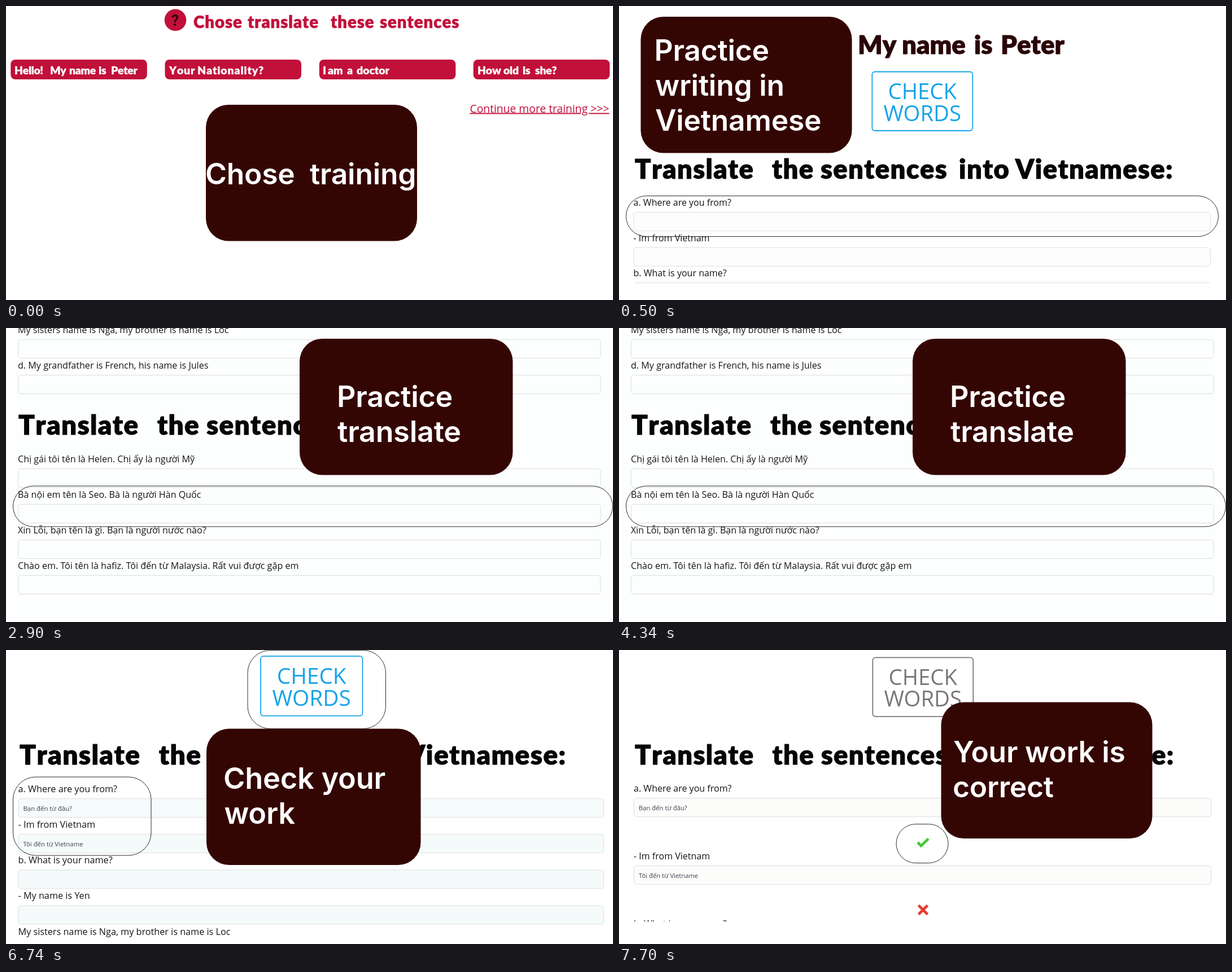
Write an HTML page that moves like this. It is 1075 px wide and 521 px high and loops after 8 s.

```html
<!DOCTYPE html>
<html lang="en">
<head>
<meta charset="utf-8">
<title>Translation training</title>
<style>
  html, body { margin: 0; width: 100%; height: 100%; overflow: hidden; background: #fff; }
  svg { display: block; width: 1075px; height: 521px; }

  .scene { visibility: hidden; animation: 8s step-end infinite; }
  #choose { animation-name: choose; }
  #write { animation-name: write; }
  #translate { animation-name: translate; }
  #check { animation-name: check; }
  #result { animation-name: result; }
  @keyframes choose { 0% { visibility: visible } 6.25%, 100% { visibility: hidden } }
  @keyframes write { 0% { visibility: hidden } 6.25% { visibility: visible } 36.25%, 100% { visibility: hidden } }
  @keyframes translate { 0% { visibility: hidden } 36.25% { visibility: visible } 66.25%, 100% { visibility: hidden } }
  @keyframes check { 0% { visibility: hidden } 66.25% { visibility: visible } 96.25%, 100% { visibility: hidden } }
  @keyframes result { 0% { visibility: hidden } 96.25%, 100% { visibility: visible } }

  text { white-space: pre; }
  .display { font-family: Lato, "Open Sans", sans-serif; font-weight: 900; font-kerning: none; stroke-width: .02em; stroke-linejoin: round; }
  .card rect { fill: #340603; }
  .card text { font-family: Inter, sans-serif; font-weight: 600; letter-spacing: -.2px; fill: #fff; }
  .label, .answer, .button text, .link { font-family: "Open Sans", "Noto Sans", sans-serif; }
  .label { fill: #151515; }
  .answer { fill: #3a414c; }
  .field { stroke: #dcdfdf; }
  .ring { fill: none; stroke: #2b2b2b; }
  .button rect { fill: #fff; stroke: currentColor; stroke-width: 1.8; }
  .button text { fill: currentColor; text-anchor: middle; }
  .link { font-size: 19.3px; font-weight: 500; fill: #c1103a; text-decoration: underline; }
  .mark { fill: none; stroke-width: 4.6; }
</style>
</head>
<body>
<svg id="stage" viewBox="0 0 1075 521" xmlns="http://www.w3.org/2000/svg"></svg>
<script>
const RED = '#c1103a', BLUE = '#16a3e8', GREY = '#7b7774';

const box = (x, y, w, h, r, attrs = '') =>
  `<rect x="${x}" y="${y}" width="${w}" height="${h}" rx="${r}" ${attrs}/>`;

const text = (x, y, str, cls = '', size = '') =>
  `<text x="${x}" y="${y}" class="${cls}"${size && ` style="font-size:${size}px"`}>${str}</text>`;

// Rounded display lettering, one start position per word
function display(str, xs, y, size, color, gap) {
  const words = str.split(' ').map((w, i) => `<tspan x="${xs[i]}">${w}</tspan>`).join(' ');
  return `<text class="display" y="${y}" fill="${color}" stroke="${color}" ` +
    `style="font-size:${size}px;letter-spacing:${gap}px">${words}</text>`;
}

const heading = (x, y, k, language = 'Vietnamese') =>
  display(`Translate the sentences into ${language}:`,
    [0, 243, 329, 574, 674].map(dx => x + dx * k), y, 47 * k, '#050505', 1.4 * k);

const card = (x, y, w, lines) =>
  `<g class="card">${box(x, y, w, 241.5, 40)}` +
  lines.map(([tx, ty, str]) => text(tx, ty, str, '', 51.5 * w / 374)).join('') + '</g>';

const ring = (x, y, w, h, r) => box(x, y, w, h, r, 'class="ring"');

function button(x, y, k, color) {
  const w = 178 * k, cx = x + w / 2, size = 38.3 * k;
  return `<g class="button" color="${color}">${box(x, y, w, 104.5 * k, 5)}` +
    text(cx, y + 48.8 * k, 'CHECK', '', size) +
    text(cx, y + 87 * k, 'WORDS', '', size) + '</g>';
}

const fields = (x, w, fill, ys) =>
  ys.map(y => box(x, y, w, 33, 5, `class="field" fill="${fill}"`)).join('');

const lines = (cls, x, size, rows) =>
  rows.map(([y, str]) => text(x, y, str, cls, size)).join('');

const pill = (x, str, xs, gap) =>
  box(x, 95, 241.5, 35, 8, `fill="${RED}"`) + display(str, xs, 120.5, 19.4, '#fff', gap);

const WHERE = 'a. Where are you from?', FROM = '- Im from Vietnam', NAME = 'b. What is your name?';
const FAMILY = 'My sisters name is Nga, my brother is name is Loc';
const REPLY_A = 'Bạn đến từ đâu?', REPLY_B = 'Tôi đến từ Vietname';

const scenes = {
  choose: [
    `<circle cx="300" cy="24.8" r="19.3" fill="${RED}"/>`,
    `<text x="299.5" y="34.5" text-anchor="middle" fill="#340603" style="font:700 27px Roboto,sans-serif">?</text>`,
    display('Chose translate these sentences', [332, 428, 575, 662], 38.5, 29.3, RED, 1),
    pill(8.3, 'Hello! My name is Peter', [15, 78, 112, 164, 186], -.3),
    pill(281.5, 'Your Nationality?', [289, 339], .9),
    pill(554.8, 'I am a doctor', [561, 570, 604, 621], 0),
    pill(827.7, 'How old is she?', [835, 881, 915, 937], -.2),
    text(821.5, 188.5, 'Continue more training &gt;&gt;&gt;', 'link'),
    card(354, 175, 374, [[353, 316, 'Chose'], [538, 316, 'training']])
  ],
  write: [
    card(38.5, 19, 374, [[62.5, 97, 'Practice'], [64, 159, 'writing in'], [64, 221, 'Vietnamese']]),
    display('My name is Peter', [423, 501, 629, 676], 85, 45.5, '#2a0507', 0),
    button(448.3, 116.5, 1, BLUE),
    heading(28, 306, 1),
    fields(26, 1021.5, '#fdfdfd', [365.5, 428]),
    '<path d="M28 490.5H1046" stroke="#dcdfdf"/>',
    lines('label', 25.5, 16, [[354, WHERE], [416.5, FROM], [479, NAME]]),
    ring(12.5, 336.5, 1049, 72, 36)
  ],
  translate: [
    box(0, 0, 1075, 521, 0, 'fill="#fdfefe"'),
    fields(21.5, 1031.5, '#fdfefe', [20.5, 83.5, 249.5, 312.5, 375.5, 438.5]),
    lines('label', 21, 16.1, [
      [9, FAMILY],
      [72, 'd. My grandfather is French, his name is Jules'],
      [238, 'Chị gái tôi tên là Helen. Chị ấy là người Mỹ'],
      [301, 'Bà nội em tên là Seo. Bà là người Hàn Quốc'],
      [363.5, 'Xin Lỗi, bạn tên là gì. Bạn là người nước nào?'],
      [426.5, 'Chào em. Tôi tên là hafiz. Tôi đến từ Malaysia. Rất vui được gặp em']
    ]),
    heading(22, 189, 1.012, 'English'),
    ring(12.5, 280, 1062, 72, 36),
    card(520, 19, 377.5, [[586, 140, 'Practice'], [587, 202, 'translate']])
  ],
  check: [
    button(451, 10.8, 1.0135, BLUE),
    heading(24, 202.5, 1.0155),
    fields(22, 1036.5, '#f5fbfb', [263.5, 326.5, 389.8, 453]),
    lines('label', 21.5, 16.22, [[251.5, WHERE], [315, FROM], [378, NAME], [441.3, '- My name is Yen'], [504.5, FAMILY]]),
    lines('answer', 30.5, 11.35, [[284.5, REPLY_A], [347.5, REPLY_B]]),
    ring(428, .5, 244.5, 139, 40),
    ring(12.5, 225, 244.5, 139, 40),
    card(355, 139.5, 379.5, [[385, 246, 'Check your'], [386.5, 308, 'work']])
  ],
  result: [
    button(449.3, 13.3, 1, GREY),
    heading(28, 202.5, 1.002),
    fields(26.5, 1022.5, '#fcfcfa', [262.5, 382.3]),
    lines('label', 26, 16.03, [[251, WHERE], [371, FROM], [491, NAME]]),
    box(0, 481, 1075, 40, 0, 'fill="#fff"'),
    lines('answer', 35, 11.25, [[283.8, REPLY_A], [403.6, REPLY_B]]),
    card(570.5, 92.5, 374, [[592, 199, 'Your work is'], [591, 261, 'correct']]),
    ring(491, 308.5, 92, 69, 34.5),
    '<path class="mark" d="M529 341L535 347L548 334.5" stroke="#43c832"/>',
    '<path class="mark" d="M530.5 452.5L546.5 468.5M546.5 452.5L530.5 468.5" stroke="#e33b31"/>'
  ]
};

document.getElementById('stage').innerHTML = Object.entries(scenes)
  .map(([id, parts]) => `<g id="${id}" class="scene">${parts.join('')}</g>`).join('');
</script>
</body>
</html>
```
